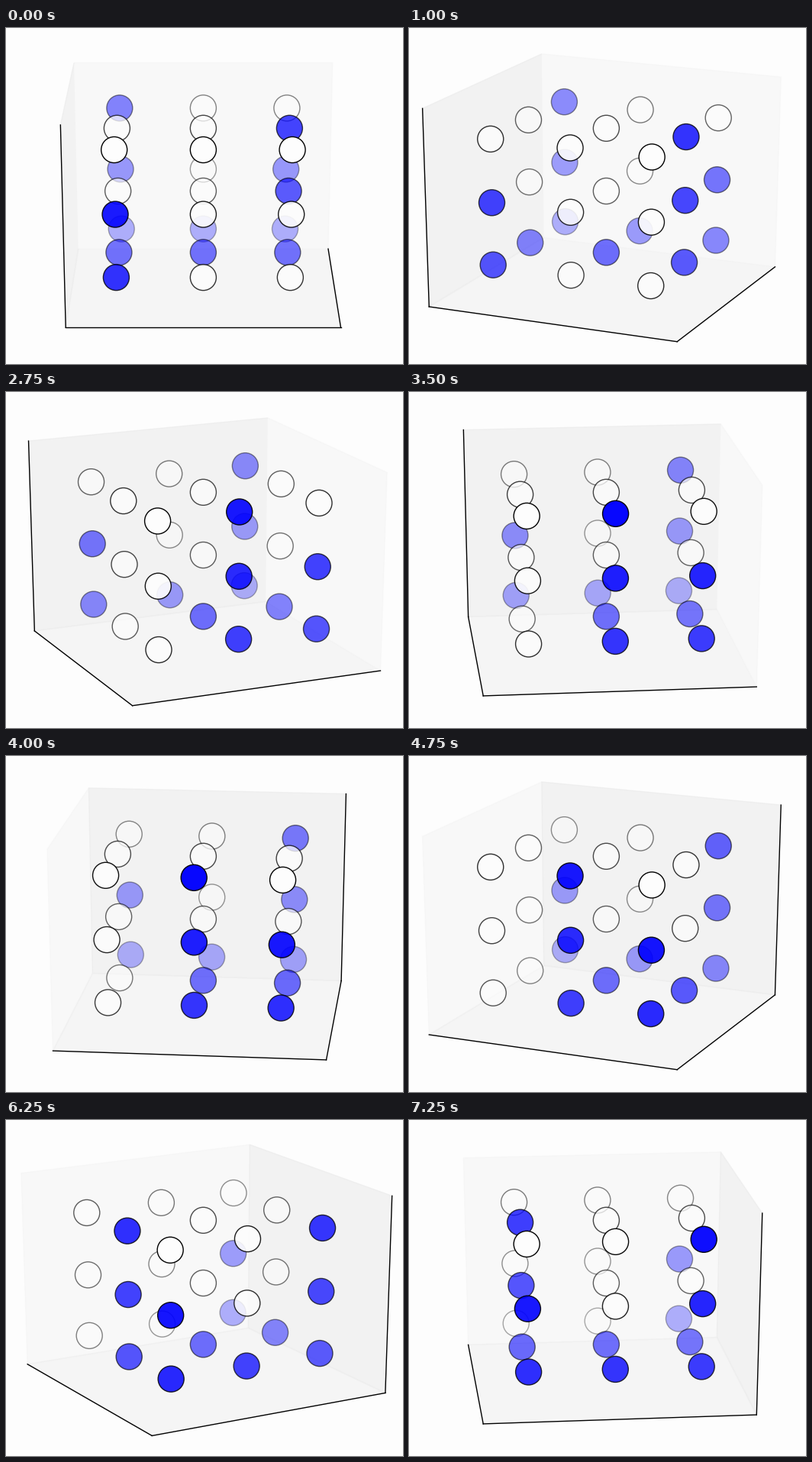
Write a matplotlib script that moves like this. It is 520 px wide and 440 px high and loops after 7500 ms.

```python
import numpy as np
import matplotlib.pyplot as plt
from matplotlib.animation import FuncAnimation
from matplotlib.patches import Polygon

W, H, DPI = 520, 440, 100
FRAMES, INTERVAL, STEP = 30, 250, 6
ELEV = np.radians(20)
DIST = 10
CENTER = np.array([258.38, 213.51])
SCALE = np.array([620, -480]) / 0.185
EDGE = 25 / 48          # half width of the box
SPACING = 1 / 3         # distance between neighbouring points
WHITE = 253 / 255

# Layers from top to bottom; rows run along x, columns along y.
LAYERS = [("100", "001", "000"),
          ("101", "001", "100"),
          ("111", "111", "100")]

points, colors = [], []
for z, layer in zip((1, 0, -1), LAYERS):
    for x, row in zip((-1, 0, 1), layer):
        for y, cell in zip((-1, 0, 1), row):
            points.append((x * SPACING, y * SPACING, z * SPACING))
            colors.append((0, 0, 1, 1) if cell == "1" else (WHITE,) * 3 + (1,))
points, colors = np.array(points), np.array(colors, dtype=float)


def project(pts, azim):
    """Return pixel positions and camera depths of 3D points."""
    x, y, z = np.asarray(pts, float).T
    side = y * np.cos(azim) - x * np.sin(azim)
    toward = x * np.cos(azim) + y * np.sin(azim)
    up = z * np.cos(ELEV) - toward * np.sin(ELEV)
    depth = DIST - z * np.sin(ELEV) - toward * np.cos(ELEV)
    flat = np.column_stack([side, up]) / depth[:, None]
    return CENTER + SCALE * flat, depth


fig = plt.figure(figsize=(W / DPI, H / DPI), dpi=DPI, facecolor=(WHITE,) * 3)
ax = fig.add_axes([0, 0, 1, 1])
ax.set_xlim(0, W)
ax.set_ylim(H, 0)
ax.axis("off")

panes = []
for gray in (0.958, 0.908, 0.933):
    rgba = (gray, gray, gray, 0.5)
    pane = Polygon([(0, 0), (1, 0), (1, 1), (0, 1)], closed=False,
                   facecolor=rgba, edgecolor=rgba, linewidth=1, zorder=1)
    panes.append(ax.add_patch(pane))
lines = [ax.plot([], [], color="black", lw=1, zorder=2)[0] for _ in range(3)]
dots = ax.scatter(points[:, 0], points[:, 1], s=600, linewidths=1, zorder=3)


def update(n):
    azim = np.radians(n * STEP)
    e = EDGE
    far_x = -e if n * STEP <= 90 else e
    far_y = -e
    near_x, near_y = -far_x, -far_y

    corners = [(-e, -e), (e, -e), (e, e), (-e, e)]
    faces = [[(far_x, a, b) for a, b in corners],
             [(a, far_y, b) for a, b in corners],
             [(a, b, -e) for a, b in corners]]
    for pane, face in zip(panes, faces):
        pane.set_xy(project(face, azim)[0])

    edges = [[(far_x, near_y, -e), (near_x, near_y, -e)],
             [(near_x, far_y, -e), (near_x, near_y, -e)],
             [(near_x, far_y, -e), (near_x, far_y, e)]]
    for line, edge in zip(lines, edges):
        line.set_data(*project(edge, azim)[0].T)

    # Farther points are drawn first and fade to 30 %.
    pos, depth = project(points, azim)
    order = np.argsort(-depth, kind="stable")
    far = -1 / depth[order]
    alpha = 1 - 0.7 * (far - far.min()) / (far.max() - far.min())
    fill = colors[order]
    fill[:, 3] = alpha
    rim = np.zeros_like(fill)
    rim[:, 3] = alpha
    dots.set_offsets(pos[order])
    dots.set_facecolor(fill)
    dots.set_edgecolor(rim)
    return [*panes, *lines, dots]


anim = FuncAnimation(fig, update, frames=FRAMES, interval=INTERVAL,
                     repeat=True, repeat_delay=0, blit=False)
plt.show()
```
